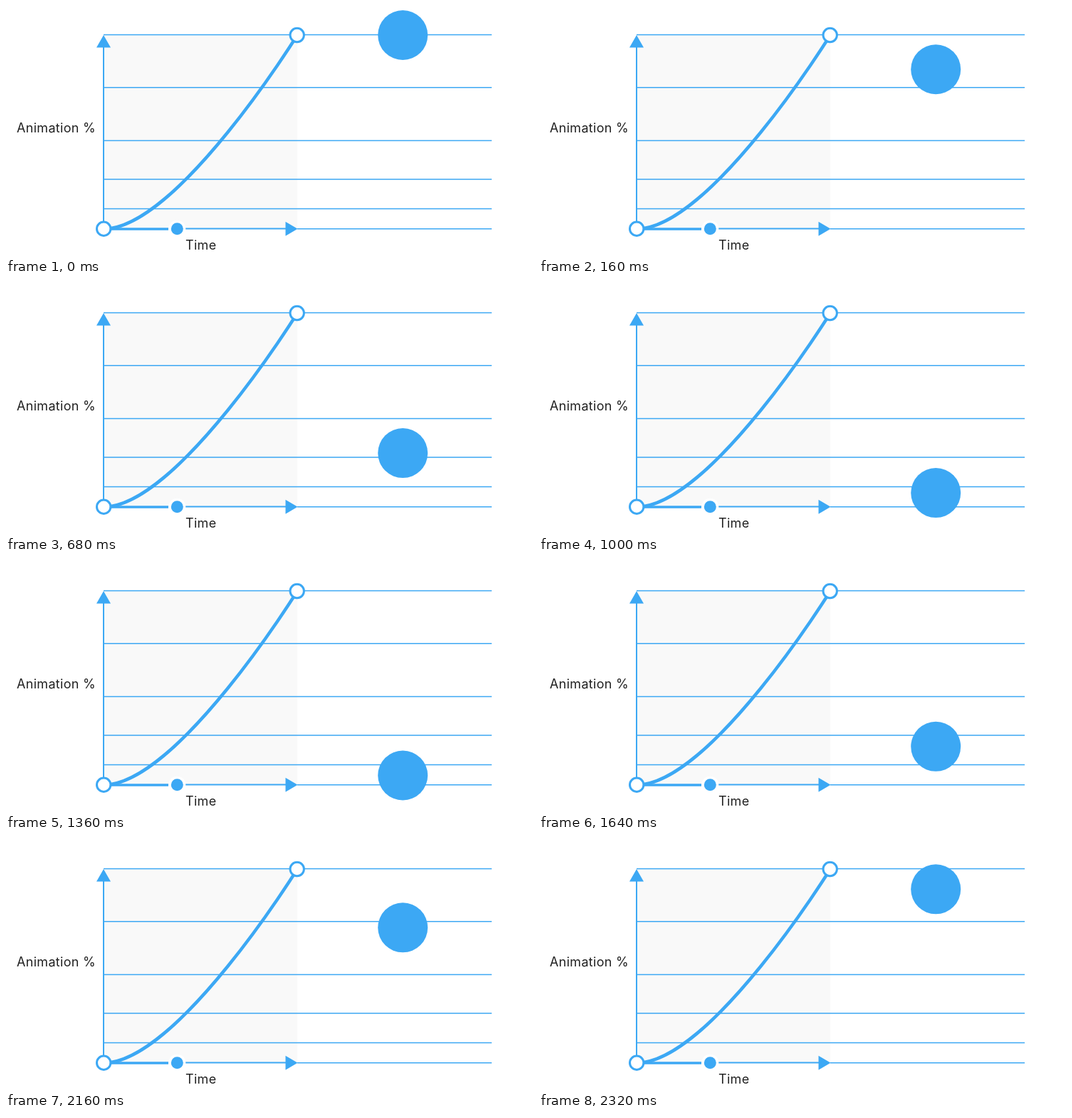
Write an HTML page that moves like this. It is 740 px wide and 352 px high and loops after 2360 ms.

```html
<!DOCTYPE html>
<html lang="en">
<head>
<meta charset="utf-8">
<title>Easing curve</title>
<style>
  html, body { margin: 0; width: 100%; height: 100%; overflow: hidden; background: #fff; }
  svg { display: block; }
  text { font: 18px Inter, sans-serif; letter-spacing: .3px; fill: #222; }
  .line { fill: none; stroke: #3ca8f4; }
  .solid { fill: #3ca8f4; }
  .node { fill: #fff; stroke: #3ca8f4; stroke-width: 3; }
</style>
</head>
<body>
<svg width="740" height="352" viewBox="0 0 740 352">
  <rect x="137" y="41" width="272" height="273" fill="#f9f9f9"/>
  <path class="line" stroke-width="1.5" d="M137 40.6H682M137 114.8H682M137 189.4H682M137 243.9H682M137 285.5H682M409 313.8H682"/>
  <path class="line" stroke-width="2" d="M137 304V56M252 313.6H394"/>
  <path class="solid" d="M137 41l10 17.500h-20zM409.500 313.700l-17 10v-20z"/>
  <path class="line" stroke-width="3.500" d="M147 314H228"/>
  <circle cx="240.300" cy="313.700" r="12" fill="#fff"/>
  <circle class="solid" cx="240.300" cy="313.700" r="8.500"/>
  <path class="line" stroke-width="4.500" d="M137 314C240 314 409 41 409 41"/>
  <circle class="node" cx="137.200" cy="313.700" r="9.700"/>
  <circle class="node" cx="408.700" cy="41" r="9.700"/>
  <text x="15" y="178">Animation %</text>
  <text x="252" y="343">Time</text>
  <circle class="solid" id="ball" cx="557.200" cy="41" r="35"/>
</svg>
<script>
  const LOOP = 2360, STEP = 40, TRAVEL = 1180;
  const TOP = 41, BOTTOM = 307;
  const ball = document.getElementById('ball');
  const clamp = v => Math.min(1, Math.max(0, v));

  // cubic-bezier(.42, 0, 1, 1), solved by bisection
  function easeIn(x) {
    let lo = 0, hi = 1;
    for (let i = 0; i < 30; i++) {
      const s = (lo + hi) / 2;
      const bx = 1.26 * s * (1 - s) ** 2 + 3 * s * s - 2 * s ** 3;
      if (bx < x) lo = s; else hi = s;
    }
    return 3 * lo * lo - 2 * lo ** 3;
  }

  function draw(now) {
    const t = Math.floor((now % LOOP) / STEP) * STEP;
    const x = t < 1210 ? 1 - (t - 26) / TRAVEL : (t - 1217) / TRAVEL;
    ball.setAttribute('cy', BOTTOM + (TOP - BOTTOM) * easeIn(clamp(x)));
    requestAnimationFrame(draw);
  }
  requestAnimationFrame(draw);
</script>
</body>
</html>
```
